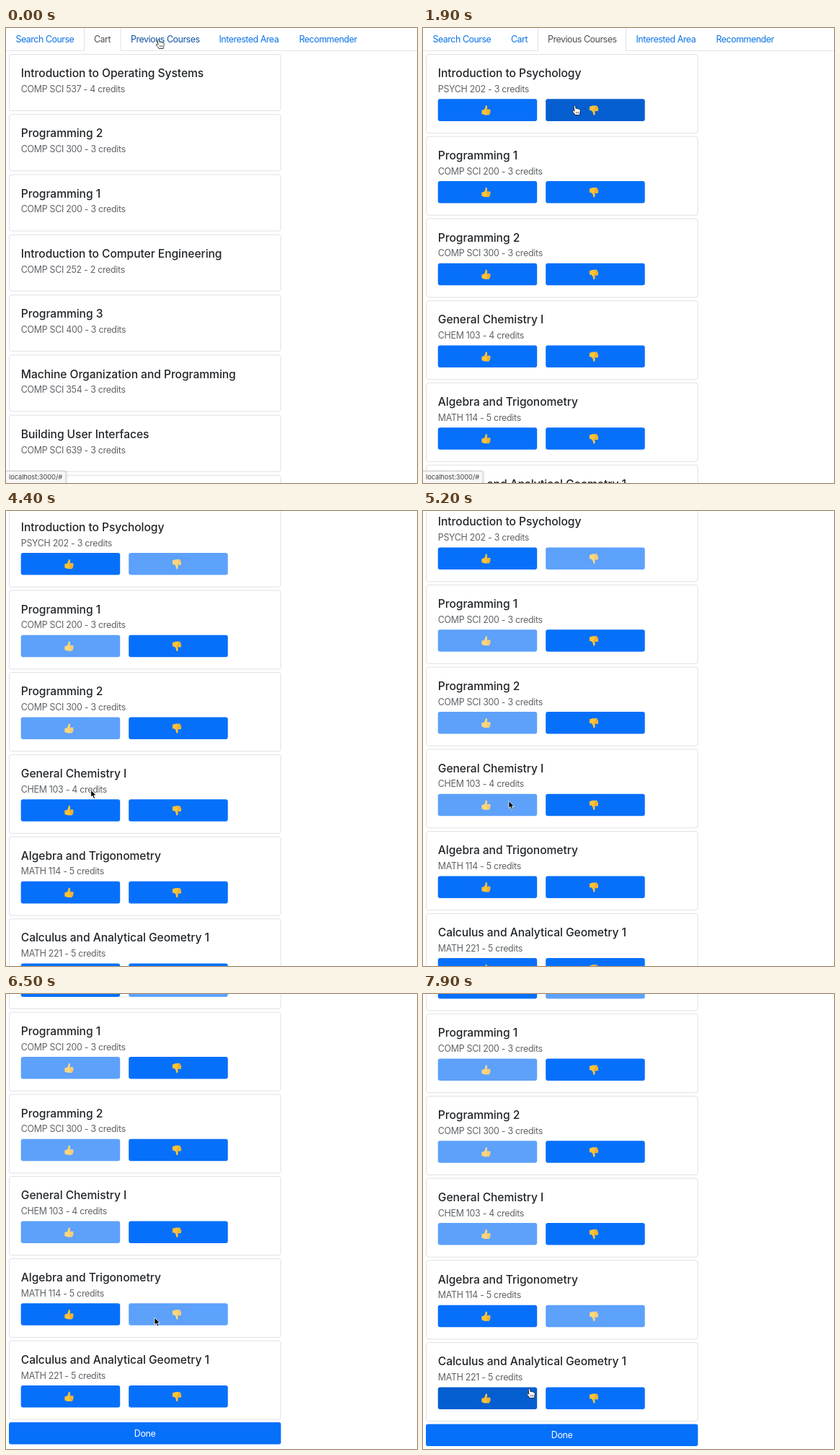
An HTML page that plays this animation: 570x630 px, repeating every 8 s.

```html
<!DOCTYPE html>
<html lang="en">
<head>
<meta charset="utf-8">
<title>Previous courses</title>
<style>
html, body { margin: 0; width: 100%; height: 100%; overflow: hidden; background: #fff; }
svg { display: block; font-family: Inter, Roboto, sans-serif; }
.title { font-size: 15.6px; font-weight: 500; letter-spacing: -.05px; fill: #212529; }
.sub { font-size: 12.4px; font-weight: 430; letter-spacing: -.28px; fill: #5f6367; }
.tab { font-size: 12.4px; letter-spacing: -.46px; }
.done { font-size: 12.4px; letter-spacing: -.3px; fill: #fff; text-anchor: middle; }
.url { font-size: 9.4px; letter-spacing: -.1px; fill: #444; }
.card, .line { fill: #fff; stroke: #dfe1e4; }
.line { fill: none; }
</style>
</head>
<body>
<svg width="570" height="630" viewBox="0 0 570 630">
  <defs>
    <g id="thumb">
      <path fill="#fdc338" d="M-6-.2L-3-.6C-1.5-2-.8-4-.7-6.2C-.6-7.4 1.6-7 1.7-4.6C1.8-3.2 1.2-2 1.2-1.3L5-1.2C6.4-1 6.4.6 5.7.9C6.6 1.4 6.4 2.8 5.6 3C6 3.8 5.6 4.8 4.8 4.9C5 5.8 4.4 6.5 3.4 6.5H-1C-2.8 6.5-3.6 5.4-6 5.2Z"/>
      <path fill="none" stroke="#d88c1c" stroke-width=".7" d="M1.6.9H5.7M1.6 3H5.6M1.6 4.9H4.8M1.2-1.3Q.2-.4.8.9"/>
    </g>
  </defs>
  <g id="page">
    <g id="nav"></g>
    <g id="cart"></g>
    <g id="previous"></g>
  </g>
  <g id="bubble">
    <rect x="-4" y="612" width="90" height="24" rx="4" opacity=".05"/>
    <rect x="-4" y="613.5" width="87" height="24" rx="3" fill="#f7f7f7" stroke="#cbcbcb"/>
    <text class="url" x="4" y="625">localhost:3000/#</text>
  </g>
  <g id="cursor">
    <g id="hand" stroke="#222" stroke-width=".9" stroke-linejoin="round">
      <path fill="#fff" d="M-1.3 1.2C-1.2-.4.8-.4 1 1.2L1.6 4.2C2.6 3.6 3.6 4 3.9 4.6C4.8 4 5.8 4.5 6 5.2C7 4.9 7.8 5.6 7.7 6.8C7.7 9 7 10 6.6 13H.6C-.2 11-2.6 9.6-3.2 7.6C-3.2 6.4-1.8 6.4-.6 7.8Z"/>
      <path fill="none" stroke-width=".6" d="M1.8 8.5V11M3.4 8.5V11M5 8.5V11"/>
    </g>
    <path id="arrow" stroke="#fff" stroke-width=".8" d="M0 0V10L2.3 8L4 12L5.8 11.2L4.2 7.4H7.4Z"/>
  </g>
</svg>
<script>
const LOOP = 8000, SWITCH = 700, BUBBLE_END = 2400;
const TRAVEL = 500, DWELL = 350, FADE = 150;
const BLUE = [7, 112, 250], DARK = [5, 94, 208];

const tabs = [["Search Course", 13.5], ["Cart", 122], ["Previous Courses", 173],
  ["Interested Area", 295.5], ["Recommender", 406.5]];
const cart = [
  ["Introduction to Operating Systems", "COMP SCI 537 - 4 credits"],
  ["Programming 2", "COMP SCI 300 - 3 credits"],
  ["Programming 1", "COMP SCI 200 - 3 credits"],
  ["Introduction to Computer Engineering", "COMP SCI 252 - 2 credits"],
  ["Programming 3", "COMP SCI 400 - 3 credits"],
  ["Machine Organization and Programming", "COMP SCI 354 - 3 credits"],
  ["Building User Interfaces", "COMP SCI 639 - 3 credits"],
  ["", ""]];

// the pointer visits one button per course, then clicks it after DWELL
const UP = 0, DOWN = 1;
const previous = [
  { name: "Introduction to Psychology", sub: "PSYCH 202 - 3 credits", vote: DOWN, arrive: 1600, stop: [210.5, 107.5] },
  { name: "Programming 1", sub: "COMP SCI 200 - 3 credits", vote: UP, arrive: 2700, stop: [113, 219] },
  { name: "Programming 2", sub: "COMP SCI 300 - 3 credits", vote: UP, arrive: 3600, stop: [113, 331] },
  { name: "General Chemistry I", sub: "CHEM 103 - 4 credits", vote: UP, arrive: 4550, stop: [119, 401.5] },
  { name: "Algebra and Trigonometry", sub: "MATH 114 - 5 credits", vote: DOWN, arrive: 6000, stop: [206, 448] },
  { name: "Calculus and Analytical Geometry 1", sub: "MATH 221 - 5 credits", vote: UP, arrive: 7700, stop: [147.5, 546.5] }];

const $ = id => document.getElementById(id);
const show = (id, on) => $(id).style.display = on ? "" : "none";
const lerp = (a, b, p) => a.map((v, i) => v + (b[i] - v) * p);
const ramp = (t, from, to) => Math.min(1, Math.max(0, (t - from) / (to - from)));
const ease = (t, from, to) => { const p = ramp(t, from, to); return p * p * (3 - 2 * p); };

const text = (cls, x, y, s) => `<text class="${cls}" x="${x}" y="${y}">${s}</text>`;
const bar = (x, y, w) => `<rect x="${x}" y="${y}" width="${w}" height="30.6" rx="3" fill="rgb(${BLUE})"/>`;
const card = (title, sub, y, h) =>
  `<rect class="card" x="4.5" y="${y}" width="376.5" height="${h}" rx="3"/>` +
  text("title", 20.8, y + 31.7, title) + text("sub", 20.8, y + 52.4, sub);
const button = (side, y) => {
  const x = 20.7 + side * 149.5;
  return `<g>${bar(x, y, 137.5)}<use href="#thumb"
    transform="translate(${x + 66.7} ${y + 15.6}) scale(1 ${side ? -1 : 1})"/></g>`;
};

$("nav").innerHTML = `<path class="line"/>` + tabs.map(([s, x]) => text("tab", x, 20, s)).join("");
$("cart").innerHTML = cart.map(([title, sub], i) => card(title, sub, 36.5 + i * 83.27, 78)).join("");
$("previous").innerHTML = previous.map(({ name, sub }, i) => {
  const y = 36.5 + i * 113.72;
  return card(name, sub, y, 109) + button(UP, y + 61.8) + button(DOWN, y + 61.8);
}).join("") + bar(4, 718, 377.3) + text("done", 192.6, 737.7, "Done");

const buttons = $("previous").querySelectorAll("g");
const labels = $("nav").querySelectorAll("text");

function drawNav(active) {
  const left = tabs[active][1] - 13.5, right = tabs[active + 1][1] - 14;
  $("nav").firstChild.setAttribute("d", `M0 31.3H${left}V-1H${right}V31.3H570`);
  labels.forEach((label, i) =>
    label.setAttribute("fill", i === active ? "#495057" : i === 2 ? "#0d509f" : "#0a73e6"));
}

function draw(t) {
  const inCart = t < SWITCH;
  show("cart", inCart);
  show("previous", !inCart);
  show("bubble", t < BUBBLE_END);
  drawNav(inCart ? 1 : 2);

  let tip = [211.5, 15.5], hand = t < previous[0].arrive - TRAVEL;
  previous.forEach(({ vote, arrive, stop }, row) => {
    const click = arrive + DWELL, b = buttons[row * 2 + vote];
    const over = t >= arrive && t < click;
    const color = lerp(BLUE, DARK, over ? ramp(t, arrive, arrive + FADE) : 0);
    b.firstChild.setAttribute("fill", `rgb(${color.map(Math.round)})`);
    b.setAttribute("opacity", 1 - .35 * ramp(t, click, click + FADE));
    tip = lerp(tip, stop, ease(t, arrive - TRAVEL, arrive));
    hand ||= over;
  });
  show("hand", hand);
  show("arrow", !hand);
  $("cursor").setAttribute("transform", `translate(${tip})`);

  const scroll = 47.8 * ease(t, 4100, 4500) + 77.2 * ease(t, 5400, 5830) - 2.5 * ease(t, 7250, 7800);
  $("page").setAttribute("transform", `translate(0 ${-scroll})`);
}

let start;
function tick(now) {
  start ??= now;
  draw((now - start) % LOOP);
  requestAnimationFrame(tick);
}
draw(0);
requestAnimationFrame(tick);
</script>
</body>
</html>
```
